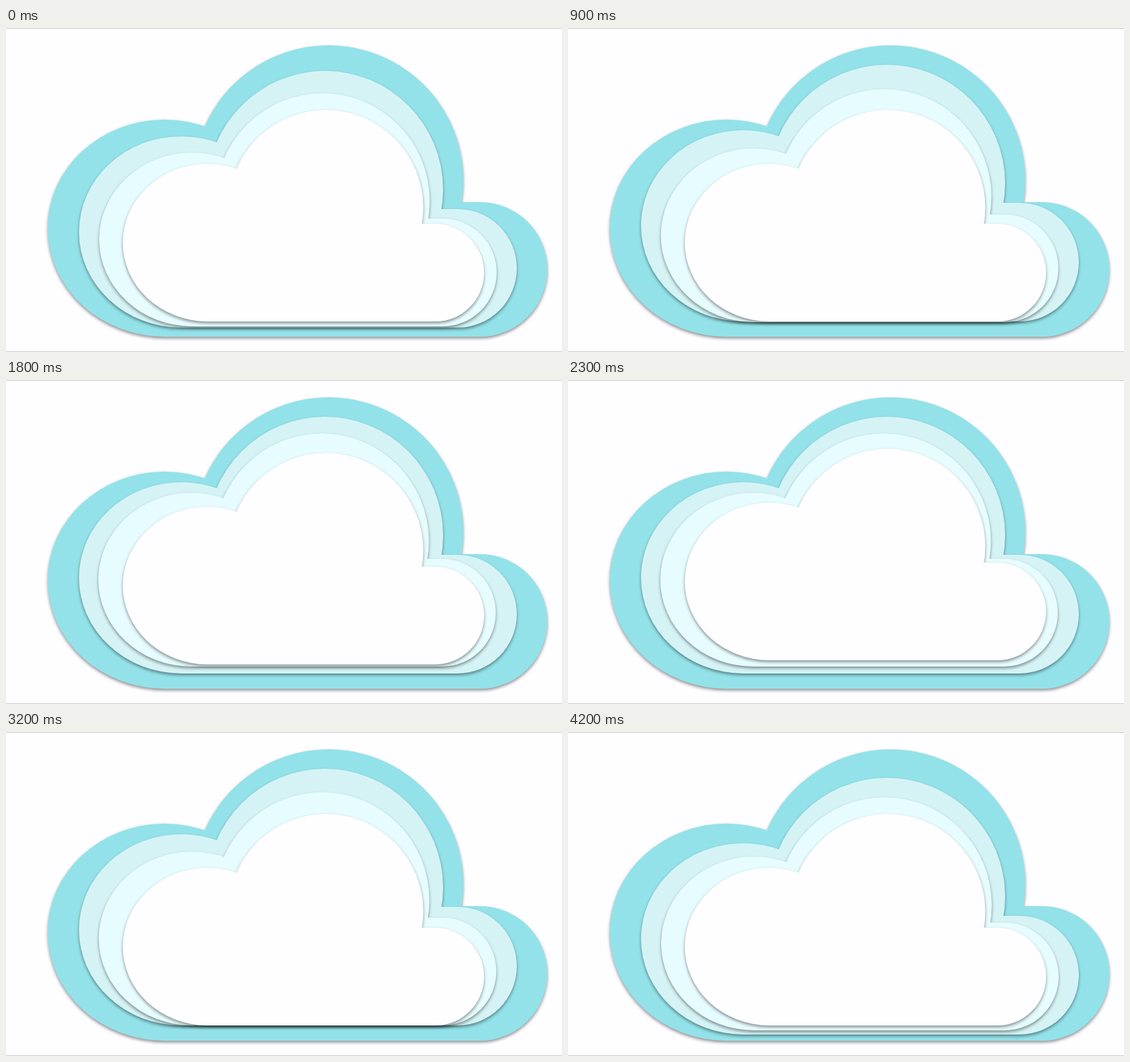
Recreate the animation shown at these times as an HTML page with a canvas. Size 800 by 467 pixels, loop 4400 ms.

```html
<!DOCTYPE html>
<html lang="en">
<head>
<meta charset="utf-8">
<title>Layered cloud</title>
<style>
  html, body { margin: 0; width: 100%; height: 100%; overflow: hidden; background: #fefdff; }
  canvas { display: block; }
</style>
</head>
<body>
<canvas id="stage" width="800" height="467"></canvas>
<script>
const ctx = document.getElementById('stage').getContext('2d');
const LOOP = 4400, STEP = 100;

// Cloud outline in its own 719 x 420 box
const cloud = new Path2D();
function lobe(x, y, rx, ry) {
  cloud.moveTo(x + rx, y);
  cloud.ellipse(x, y, rx, ry, 0, 0, Math.PI * 2);
}
lobe(168, 263.5, 168, 156.5);
lobe(404, 194, 194, 194);
lobe(622, 323, 97, 97);
cloud.rect(168, 226, 454, 194);

// low / high: top edge at rest and raised; up / down: [start, duration] in ms
const layers = [
  { color: '#93e2e9', x: 60, w: 719, h: 420, low: 25, high: 25, up: [0, 1], down: [0, 1] },
  { color: '#d5f3f5', x: 105, w: 630, h: 370, low: 66, high: 53, up: [4274, 600], down: [3620, 600] },
  { color: '#e6fcfe', x: 134, w: 572, h: 336, low: 94, high: 77, drift: -1.2, up: [768, 580], down: [3000, 600] },
  { color: '#fefdff', x: 168, w: 520, h: 305, low: 118, high: 99, up: [1550, 620], down: [2380, 600] }
];

// cubic-bezier(.25, .1, .25, 1)
function ease(x) {
  if (x <= 0) return 0;
  if (x >= 1) return 1;
  const curve = (a, b, u) => 3 * a * u * (1 - u) ** 2 + 3 * b * u * u * (1 - u) + u ** 3;
  let lo = 0, hi = 1;
  for (let i = 0; i < 24; i++) {
    const mid = (lo + hi) / 2;
    if (curve(.25, .25, mid) < x) lo = mid; else hi = mid;
  }
  return curve(.1, 1, lo);
}

// 0 = resting, 1 = raised
function lift({ up, down }, t) {
  const sinceUp = (t - up[0] + LOOP) % LOOP;
  const sinceDown = (t - down[0] + LOOP) % LOOP;
  return sinceUp < sinceDown ? ease(sinceUp / up[1]) : 1 - ease(sinceDown / down[1]);
}

function drawLayer(layer, t) {
  const k = lift(layer, t);
  const x = layer.x + (layer.drift || 0) * k;
  const y = layer.low + (layer.high - layer.low) * k;
  ctx.save();
  ctx.setTransform(layer.w / 719, 0, 0, layer.h / 420, x, y);
  ctx.shadowColor = 'rgba(0, 0, 0, .42)';
  ctx.shadowBlur = 4;
  ctx.shadowOffsetY = 2.5;
  ctx.fillStyle = layer.color;
  ctx.fill(cloud);
  ctx.restore();
}

function draw(t) {
  ctx.fillStyle = '#fefdff';
  ctx.fillRect(0, 0, 800, 467);
  ctx.fillStyle = '#ccc';
  ctx.fillRect(0, 0, 800, 1);
  ctx.fillRect(0, 466, 800, 1);
  for (const layer of layers) drawLayer(layer, t);
}

const start = performance.now();
function tick() {
  const t = (performance.now() - start) % LOOP;
  draw(Math.floor(t / STEP) * STEP);
  requestAnimationFrame(tick);
}
tick();
</script>
</body>
</html>
```
